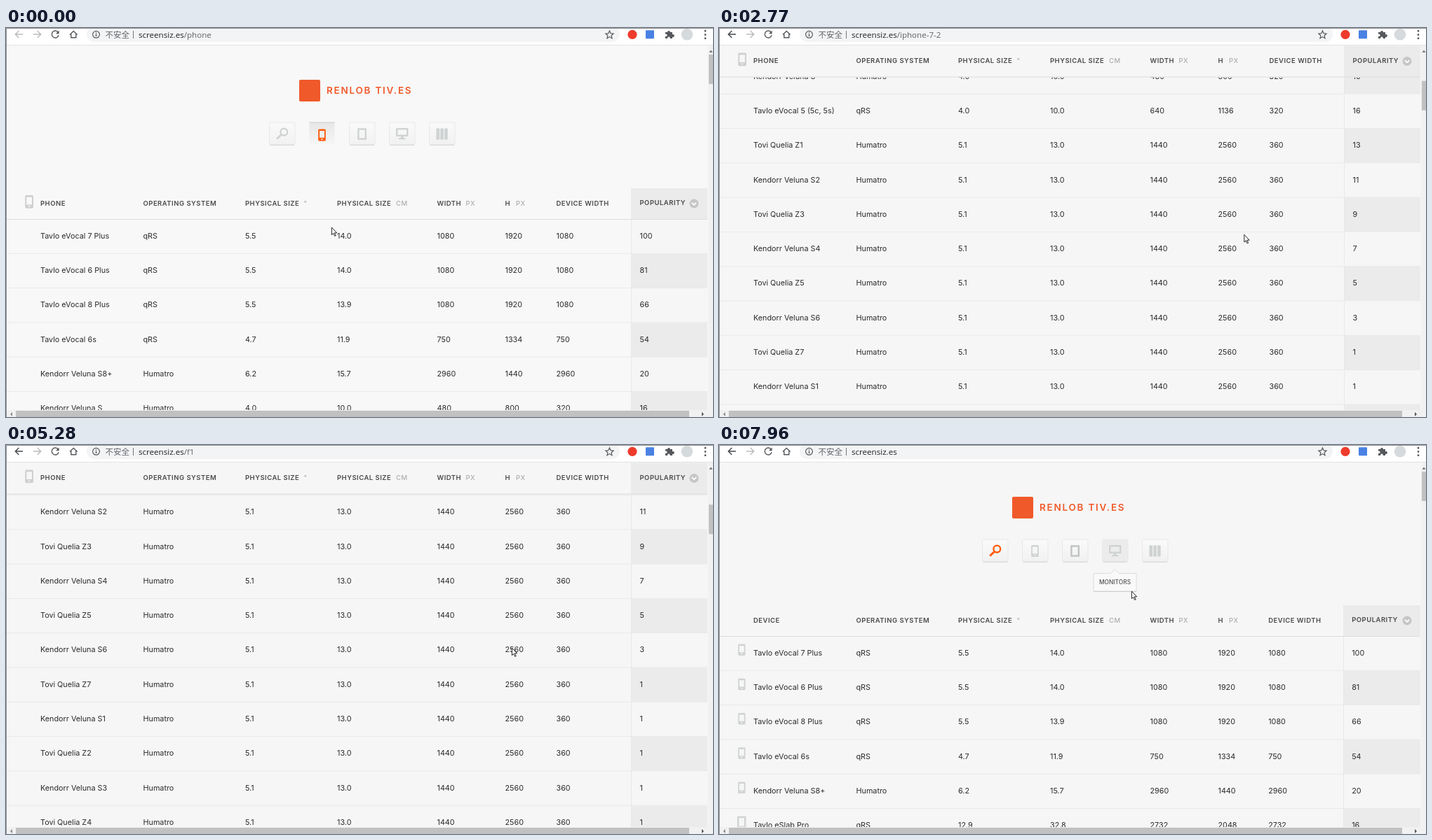
An HTML page for the animation above (7.99 s loop, 1008 by 556 pixels).

```html
<!DOCTYPE html>
<html lang="en">
<head>
<meta charset="utf-8">
<title>Phone sizes</title>
<style>
html, body { margin: 0; width: 100%; height: 100%; overflow: hidden; background: #fff; }
svg { display: block; }
#stage { width: 1008px; height: 556px; }
#stage.dev .p, #stage:not(.dev) .d { display: none; }
text { white-space: pre; }
.cell { font: 400 10.8px Inter, sans-serif; fill: #2b2b2b; }
.white { fill: #fff; }
.head { font: 600 9.5px Inter, sans-serif; letter-spacing: .48px; fill: #4a4a4a; }
.unit { font-weight: 500; fill: #adadad; }
.brand { font: 600 13.5px Inter, sans-serif; letter-spacing: 1.75px; fill: #f0592a; }
.tipText { font: 500 8.4px Inter, sans-serif; fill: #555; text-anchor: middle; }
.url { font: 400 11.6px "Open Sans", "Noto Sans", sans-serif; fill: #202124; }
.cjk { font: 400 11.5px "Noto Sans CJK SC", "Noto Sans CJK", sans-serif; fill: #5f6368; }
.line { fill: none; stroke: #55585c; stroke-width: 1.4; }
</style>
</head>
<body>
<svg id="stage" viewBox="0 0 1008 556" xmlns="http://www.w3.org/2000/svg">
  <defs>
    <linearGradient id="raised" x2="0" y2="1"><stop stop-color="#fafafa"/><stop offset="1" stop-color="#f1f1f1"/></linearGradient>
    <linearGradient id="pressed" x2="0" y2="1"><stop stop-color="#e6e6e6"/><stop offset="1" stop-color="#f6f6f6"/></linearGradient>
  </defs>
  <rect width="1008" height="556" fill="#fff"/>

  <g id="toolbar">
    <rect x="115" y="-2" width="760" height="22" rx="11" fill="#f3f4f5"/>
    <path id="back" class="line" d="M24 9H13.5M18.3 4l-5 5 5 5"/>
    <path class="line" style="stroke:#b9bbbd" d="M39 9h10.5M44.7 4l5 5-5 5"/>
    <path class="line" d="M74.3 6a5 5 0 1 0 .8 4.2"/>
    <path d="M75.6 3.6v4.6H71z" fill="#55585c"/>
    <path class="line" d="M91 9.5l5.3-5 5.3 5M92.8 8.5v5.3h7V8.5"/>
    <circle class="line" style="stroke-width:1.2" cx="128.5" cy="9.3" r="4.9"/>
    <path class="line" d="M128.5 8.5v3.6M128.5 6.2v1.4"/>
    <text class="cjk" x="141.5" y="13.6">不安全</text>
    <path d="M181.5 4v11" stroke="#777"/>
    <text class="url" x="189" y="13.5">screensiz.es<tspan id="path" fill="#5f6368"></tspan></text>
    <path class="line" style="stroke-width:1.2" d="M860.5 4l1.6 3.7 4 .4-3 2.7.9 3.9-3.5-2.1-3.5 2.1.9-3.9-3-2.7 4-.4z"/>
    <circle cx="893" cy="9.3" r="6.6" fill="#ee3b2b"/>
    <rect x="912" y="3.3" width="12" height="12" rx="1" fill="#4a82e4"/>
    <path d="M940 6h3a2 2 0 1 1 4 0h3v3.2a2 2 0 1 1 0 3.6V15h-3.4a1.8 1.8 0 1 0-3.4 0H940v-3.2a1.8 1.8 0 1 0 0-3.2z" fill="#55585c"/>
    <circle cx="971" cy="9.3" r="8.3" fill="#d5dadd"/>
    <path d="M997 3v2.6M997 8.2v2.6M997 13.4v2.6" stroke="#55585c" stroke-width="2.4"/>
    <path d="M0 24.5h1008" stroke="#e2e2e2"/>
  </g>

  <svg y="25" width="1001" height="521" viewBox="0 25 1001 521">
    <rect id="bg" y="25" width="1001" height="521"/>
    <g id="page"></g>
    <g id="header"></g>
  </svg>

  <rect x="1001" y="25" width="7" height="531" fill="#f1f1f1"/>
  <path d="M1002.5 35l2.5-3.5 2.5 3.5z" fill="#777"/>
  <rect id="thumb" x="1002" y="38" width="6" height="42" fill="#c1c1c1"/>
  <rect y="546" width="1001" height="10" fill="#f1f1f1"/>
  <rect x="14" y="547" width="960" height="9" fill="#c1c1c1"/>
  <path d="M9 549v6l-3-3z" fill="#8a8a8a"/>
  <path d="M992 549v6l3-3z" fill="#555"/>
  <path d="M.5 556V.5H1008" fill="none" stroke="#8e8e8e"/>

  <path id="arrow" d="M.4 0v10.6l2.4-2.2 1.8 4 1.6-.7-1.8-3.9h3.3z" fill="#fff" stroke="#111" stroke-width=".9"/>
  <path id="beam" d="M-3-6.5h2.2q.8 0 .8 1v11q0 1-.8 1H-3M3-6.5H.8q-.8 0-.8 1M3 6.5H.8q-.8 0-.8-1" fill="none" stroke="#222"/>
</svg>

<script>
const LOOP = 7990, TOP = 273.4, PITCH = 49.3, DOCK = 203.5;
const GREY = '#d0d3d3', ORANGE = '#ff5a0a';
const COLS = [49, 195.5, 341, 472, 614.5, 711.5, 784.5, 903.5];
const $ = id => document.getElementById(id);

// name | system | inch | cm | width | height | device width | popularity
const first = [
  'Tavlo eVocal 7 Plus|qRS|5.5|14.0|1080|1920|1080|100',
  'Tavlo eVocal 6 Plus|qRS|5.5|14.0|1080|1920|1080|81',
  'Tavlo eVocal 8 Plus|qRS|5.5|13.9|1080|1920|1080|66',
  'Tavlo eVocal 6s|qRS|4.7|11.9|750|1334|750|54',
  'Kendorr Veluna S8+|Humatro|6.2|15.7|2960|1440|2960|20'
];
const next = [
  'Kendorr Veluna S|Humatro|4.0|10.0|480|800|320|16',
  'Tavlo eVocal 5 (5c, 5s)|qRS|4.0|10.0|640|1136|320|16'
];
const middle = Array.from({ length: 12 }, (_, i) =>
  (i % 2 ? 'Kendorr Veluna S' : 'Tovi Quelia Z') + (i % 7 + 1) +
  '|Humatro|5.1|13.0|1440|2560|360|' + Math.max(1, 13 - 2 * i));
const last = [
  'QJ V10|Humatro|5.7|14.5|1440|2560|1440|1',
  'Kendorr Veluna Memo5|Humatro|5.7|14.5|1440|2560|1440|1',
  'Kendorr Veluna Memo4|Humatro|5.7|14.5|1440|2560|1440|1',
  'Tovi Quelia Z3|Humatro|5.2|13.2|1080|1920|1080|1',
  'Tovi Quelia Z5|Humatro|5.2|13.2|1080|1920|1080|1',
  'Ruvo F1|Humatro|5.0|12.0|1280|720|1280|1',
  'GreenThorn Envelope|GreenThorn|4.5|11.0|1440|1440|1440|1',
  'Velka Dorio (710, 800)|Parqets|3.7|9.4|480|800|320|1',
  'GreenThorn Hush|Humatro|5.4|13.7|1440|2560|1440|1',
  'Morvane Two Press Hero/Ultra|Humatro|4.7|11.9|720|1280|360|0',
  'Morvane Two Press Ultra/995|Humatro|4.3|10.9|480|800|320|0'
];
const phones = [...first, ...next, ...middle, ...last];
const devices = [...first, 'Tavlo eSlab Pro|qRS|12.9|32.8|2732|2048|2732|16'];
const PICKED = 24;

const text = (x, y, s, cls = 'cell') => `<text class="${cls}" x="${x}" y="${y}">${s}</text>`;
const rect = (x, y, w, h, fill, more = '') =>
  `<rect x="${x}" y="${y}" width="${w}" height="${h}" fill="${fill}" ${more}/>`;

function phoneIcon(x, y, color, s = 1) {
  return `<path transform="translate(${x} ${y}) scale(${s})" fill="${color}" fill-rule="evenodd"
    d="M1.5 0h7.6q1.5 0 1.5 1.5v14q0 1.5-1.5 1.5H1.5Q0 17 0 15.5v-14Q0 0 1.5 0zM1.8 2.6v9.6h7V2.6zM4.3 13.6v1.6h2v-1.6z"/>`;
}
const slab = (x, y, w, h, color, id = '') =>
  `<rect ${id} x="${x}" y="${y}" width="${w}" height="${h}" fill="none" stroke="${color}" stroke-width="2.4"/>`;

function button(x, id = '') {
  return rect(x - 18, 135, 36.5, 32, 'url(#raised)', `${id} rx="2" stroke="#e8e8e8"`) +
    `<path d="M${x - 17} 167.2h34.5" stroke="#d3d3d3"/>`;
}
function lens(color) {
  return `<path d="M392.5 152.5l-6.3 6" stroke="${color}" stroke-width="3"/>
    <circle cx="396.3" cy="148.6" r="4.9" fill="none" stroke="${color}" stroke-width="2.3"/>`;
}
function tip(id, x, w, label) {
  const l = x - w / 2;
  return `<g id="${id}"><path d="M${l} 183.5H${x - 6}l6-6 6 6H${l + w}V209H${l}z" fill="#f9f9f9" stroke="#dcdcdc"/>
    <path d="M${l} 209.5h${w}" stroke="#cfcfcf"/>${text(x, 199, label, 'tipText')}</g>`;
}
function nav() {
  return button(393.5) + `<g class="p">${lens(GREY)}</g><g class="d">${lens(ORANGE)}</g>` +
    `<g class="p">${rect(432.5, 134.5, 36, 32, 'url(#pressed)')}<path d="M432.5 135h36" stroke="#cfcfcf"/>${phoneIcon(445.2, 144.5, ORANGE)}</g>` +
    `<g class="d">${button(450.5)}${phoneIcon(445.2, 143, GREY)}</g>` +
    button(507.5) + slab(502.4, 144.5, 10.4, 14, GREY, 'id="tablet"') +
    button(564.5, 'id="monitor"') + slab(557.2, 144.2, 15, 9.6, GREY) + rect(563, 155, 3.5, 3, GREY) + rect(560, 157, 9.5, 2.2, GREY) +
    button(621.5) + [613.5, 619.3, 625.1].map(x => rect(x, 143.5, 4.6, 16, GREY)).join('');
}

function table(list, dev) {
  const shift = dev ? -1.3 : 0;
  return list.map((line, i) => {
    const y = TOP + i * PITCH, base = y + 27.4, cells = line.split('|');
    const names = cells[0].split('/');
    const px = 891 + (dev ? -1 : 0);
    let s = rect(px, y, 1000 - px, PITCH, i % 2 ? '#ebebeb' : '#f6f6f6') +
      rect(px, y, 1, PITCH, '#e8e8e8') + rect(0, y + PITCH - .9, 1000, 1, '#e9e9e9');
    if (!dev && (i === 0 || i === PICKED)) {
      s += `<g id="glow${i}">${rect(0, y, 891, PITCH - .6, '#fff9ba')}${rect(891, y, 109, PITCH - .6, '#ece7b2')}</g>`;
    }
    if (dev) s += i === 5 ? slab(27.2, y + 12, 10, 14, GREY) : phoneIcon(27.3, y + 11, GREY, .97);
    names.forEach((n, k) => s += text(COLS[0], base + (names.length > 1 ? k * 11.6 - 5.8 : 0), n));
    cells.slice(1).forEach((c, k) => s += text(COLS[k + 1] + (k > 4 ? shift : 0), base, c));
    if (!dev && i === PICKED) {
      cells.slice(0, 5).forEach((c, k) => s +=
        `<svg class="sel" x="${COLS[k] - .5}" y="${y + 17}" width="0" height="13">` +
        rect(0, 0, 200, 13, '#3390ff') + text(.5, 10.4, c, 'cell white') + '</svg>');
    }
    return s;
  }).join('');
}

function heading(dev) {
  const shift = dev ? -1.3 : 0, px = dev ? 890 : 891, y = 253.6;
  const names = [dev ? 'DEVICE' : 'PHONE', 'OPERATING SYSTEM', 'PHYSICAL SIZE', 'PHYSICAL SIZE', 'WIDTH', 'H', 'DEVICE WIDTH', 'POPULARITY'];
  const units = [[424.5, '"'], [556, 'CM'], [655.5, 'PX'], [727, 'PX']];
  return rect(px, 229, 1000 - px, 45, '#ebebeb') + rect(0, 273, 1000, 1, '#dedede') +
    names.map((n, i) => text(COLS[i] + (i > 5 ? shift : 0), i === 7 ? y - .6 : y, n, 'head')).join('') +
    units.map(([x, s]) => text(x, y, s, 'head unit')).join('') +
    (dev ? '' : phoneIcon(27.3, 239, '#cfcfcf', 1.1)) +
    '<circle cx="981" cy="251" r="6.5" fill="#c6c6c6"/><path d="M977.8 249.6l3.2 3.2 3.2-3.2" fill="none" stroke="#fff" stroke-width="1.8"/>';
}

$('page').innerHTML =
  rect(418, 74, 30, 31, '#f0592a', 'rx="2"') + text(457, 94.4, 'RENLOB TIV.ES', 'brand') + nav() +
  `<g class="p">${table(phones, false)}</g><g class="d">${table(devices, true)}</g>` +
  tip('tipTablet', 507.5, 51, 'TABLETS') + tip('tipSearch', 393.5, 53, 'SEARCH') + tip('tipMonitor', 564.5, 61, 'MONITORS');
$('header').innerHTML = rect(0, 228, 1001, 46, '#f7f7f7', 'id="headBg"') +
  `<g class="p">${heading(false)}</g><g class="d">${heading(true)}</g>`;

const selected = [...document.querySelectorAll('.sel')].map((el, i) =>
  ({ el, x: COLS[i], w: el.querySelector('text').getComputedTextLength() + 2 }));

// time, value...
const scrollKeys = [[2220, 0], [2370, 27], [2500, 110], [2700, 390], [2960, 700], [3030, 720], [3260, 1133.7],
  [3400, 1216], [4900, 1216], [5100, 900], [5350, 480], [5620, 125], [5670, 120], [5760, 80], [5900, 0]];
const mouseKeys = [[120, 464, 285], [910, 321, 297], [1370, 321, 297], [2130, 745, 296], [2370, 745, 296], [3100, 751, 295],
  [3420, 751, 295], [3800, 66, 264], [3840, 66, 264], [3890, 64, 264], [4040, 64, 264], [4100, 50, 264], [4560, 698, 274],
  [4850, 698, 274], [5050, 721, 290], [5840, 721, 290], [6060, 560, 294], [6160, 518, 280], [6380, 509, 160],
  [6910, 509, 160], [7240, 392, 160], [7560, 392, 160], [7800, 565, 161], [7960, 588, 209]];
const pathKeys = [[0, '/phone'], [1040, '/iphone-7-2'], [4560, '/f1'], [7540, '']];

const clamp = (v, a = 0, b = 1) => Math.min(b, Math.max(a, v));
const ramp = (t, a, b) => clamp((t - a) / (b - a));
const smooth = u => u * u * (3 - 2 * u);
function at(keys, t, ease = u => u) {
  const n = keys.findIndex(k => k[0] > t);
  if (n === 0) return keys[0].slice(1);
  if (n < 0) return keys[keys.length - 1].slice(1);
  const a = keys[n - 1], b = keys[n], u = ease((t - a[0]) / (b[0] - a[0]));
  return a.slice(1).map((v, i) => v + (b[i + 1] - v) * u);
}
const set = (id, name, v) => $(id).setAttribute(name, v);

function draw(t) {
  const [s] = at(scrollKeys, t);
  const [mx, my] = at(mouseKeys, t, smooth);
  const tone = t < 2300 ? '#f8f8f8' : '#f6f6f6';
  $('stage').classList.toggle('dev', t >= 7540);
  $('path').textContent = pathKeys.filter(k => k[0] <= t).pop()[1];
  $('back').style.stroke = t < 1040 ? '#b9bbbd' : '#45484c';
  set('bg', 'fill', tone);
  set('headBg', 'fill', tone);
  set('page', 'transform', `translate(0 ${-s})`);
  set('header', 'transform', `translate(0 ${-Math.min(s, DOCK)})`);
  set('thumb', 'y', 38 + s * .0794);

  set('glow0', 'opacity', t < 4560 ? ramp(t, 1040, 1220) : 0);
  set('glow' + PICKED, 'opacity', ramp(t, 4560, 4710));
  const reach = t < 4100 ? 0 : t < 4560 ? mx : 698;
  selected.forEach(c => c.el.setAttribute('width', clamp(reach - c.x, 0, c.w)));

  set('tipTablet', 'opacity', ramp(t, 6530, 6630) - ramp(t, 6910, 7010));
  set('tipSearch', 'opacity', t < 7540 ? ramp(t, 7220, 7330) : 0);
  set('tipMonitor', 'opacity', ramp(t, 7780, 7880));
  set('tablet', 'stroke', t > 6540 ? '#c0c4c4' : GREY);
  set('monitor', 'fill', t > 7780 ? '#ececec' : 'url(#raised)');

  const beam = t >= 3780 && t < 4540;
  set('arrow', 'transform', `translate(${mx} ${my})`);
  set('beam', 'transform', `translate(${mx} ${my})`);
  set('arrow', 'opacity', beam ? 0 : 1);
  set('beam', 'opacity', beam ? 1 : 0);
}

function tick() {
  draw(performance.now() % LOOP);
  requestAnimationFrame(tick);
}
tick();
</script>
</body>
</html>
```
